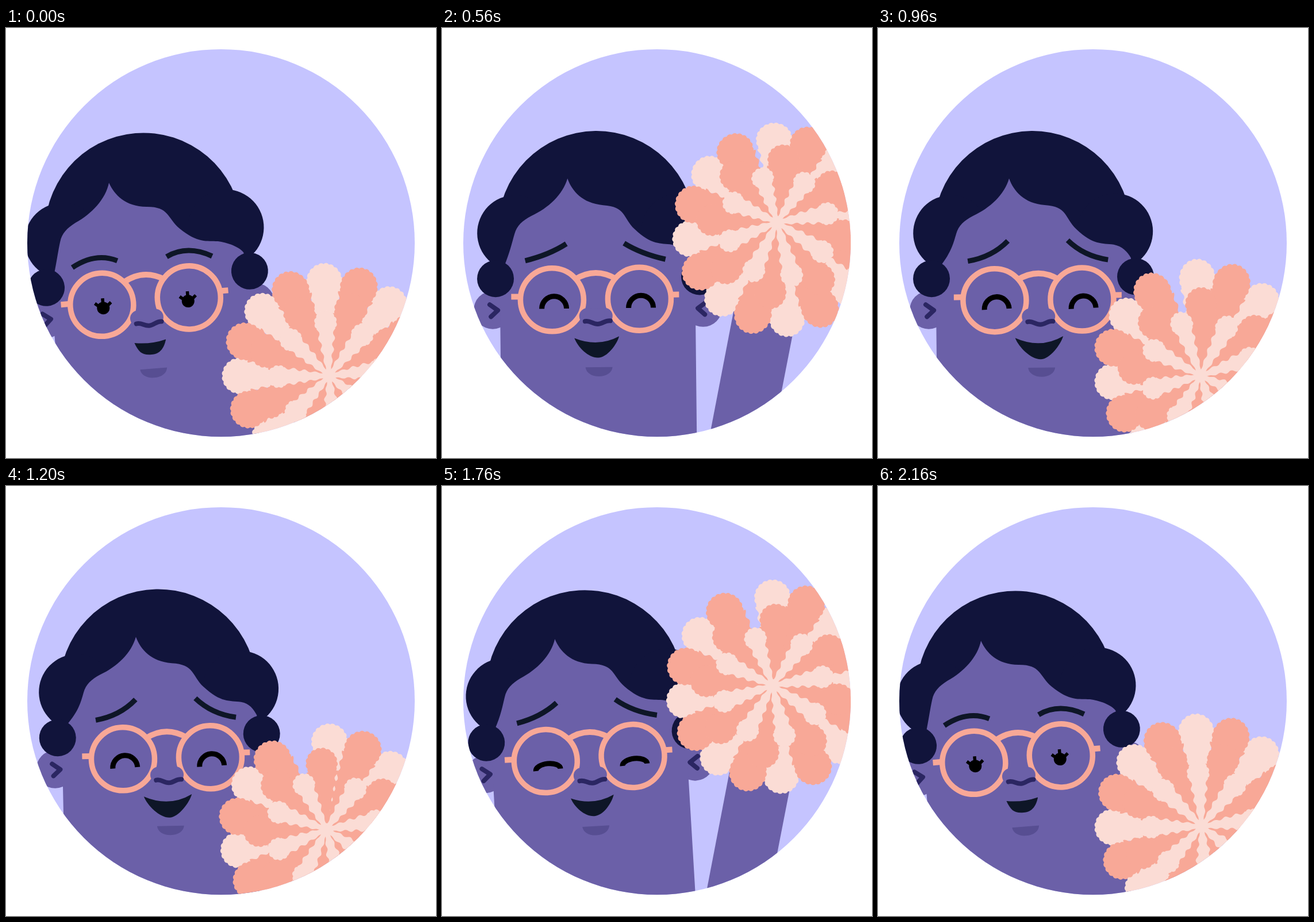
Animation of 748 by 748 pixels, one loop 2.24 s. Source, as an HTML page with a canvas:

```html
<!DOCTYPE html>
<html lang="en">
<head>
<meta charset="utf-8">
<style>
html, body { margin: 0; width: 100%; height: 100%; overflow: hidden; background: #fff; }
canvas { display: block; }
</style>
</head>
<body>
<canvas id="stage" width="748" height="748"></canvas>
<script>
const ctx = document.getElementById('stage').getContext('2d');
const TAU = Math.PI * 2, DEG = Math.PI / 180;
const STEP = 80, STEPS = 28;
const SKIN = '#6b60a8', HAIR = '#11143b', INK = '#0e1627', LINE = '#2b2662';
const CORAL = '#f8a897', PALE = '#fbdcd5';

// Pose tracks, all keyed at the steps in KEYS
const KEYS = [0, 3, 7, 12, 14, 18, 22, 27, 28];
const TRACKS = {
  tilt:    [-4.7, -3.4, -.6, -.6, -.9, -2.25, -3.4, -4.7, -4.7],
  turn:    [-15.5, -15, -11.5, 0, 3, 4, -8.5, -15.5, -15.5],
  worry:   [0, 0, .8, 1, 1, 1, .9, 0, 0],
  smile:   [0, .15, .8, 1, 1, 1, .7, 0, 0],
  x:       [562, 581, 583, 561, 555, 570, 575, 563, 562],
  y:       [605, 375, 338, 605, 635, 378, 347, 592, 605],
  lagX:    [0, 5, 3, 0, 0, -4, 0, 0, 0],
  lagY:    [-8, 15, 11, -14, 0, 5, 2, -8, -8],
  outer:   [-3, -9, -5, -6, -6, -6, -5, -3.5, -3],
  inner:   [-4, -17, -16, -18, -18, -17, -15, -4, -4],
  part:    [0, 10, 2, 4, 6, 16, 5, 0, 0]
};

const mix = (a, b, t) => a + (b - a) * t;

// Monotone cubic interpolation
function sample(values, n) {
  const last = KEYS.length - 1;
  const slope = i => (values[i + 1] - values[i]) / (KEYS[i + 1] - KEYS[i]);
  const tangent = i => {
    if (i === 0 || i === last) return 0;
    const a = slope(i - 1), b = slope(i);
    return a * b > 0 ? 2 * a * b / (a + b) : 0;
  };
  let i = 0;
  while (i < last - 1 && n >= KEYS[i + 1]) i++;
  const h = KEYS[i + 1] - KEYS[i], u = (n - KEYS[i]) / h, v = 1 - u;
  return values[i] * (1 + 2 * u) * v * v + values[i + 1] * u * u * (3 - 2 * u)
    + h * u * v * (tangent(i) * v - tangent(i + 1) * u);
}

function disc(x, y, r, color) {
  ctx.fillStyle = color;
  ctx.beginPath();
  ctx.arc(x, y, r, 0, TAU);
  ctx.fill();
}

function fill(d, color) {
  ctx.fillStyle = color;
  ctx.fill(new Path2D(d));
}

function stroke(d, color, width, cap = 'butt') {
  ctx.strokeStyle = color;
  ctx.lineWidth = width;
  ctx.lineCap = cap;
  ctx.lineJoin = 'round';
  ctx.stroke(new Path2D(d));
}

function drawHead(pose, n) {
  const mid = 274;
  ctx.save();
  ctx.translate(300, 765);
  ctx.rotate(pose.tilt * DEG);
  ctx.translate(-300, -765);

  disc(273, 350.3, 171.5, HAIR);
  for (const s of [-1, 1]) {
    disc(mid + s * 142.5, 355, 66, HAIR);
    disc(mid + s * 183, 488.5, 33, SKIN);
  }

  // Hairline follows the turn of the face, its ends stay put
  const s = pose.turn * .85;
  const p = (x, y) => `${x + s} ${y} `;
  fill('M104 415L111.7 413C' + p(132, 388) + p(136, 370) + p(140.3, 356.3)
    + 'C' + p(144.4, 342) + p(154.5, 333.4) + p(169.6, 325.6)
    + 'C' + p(199.7, 312) + p(225, 289) + p(233.3, 261)
    + 'C' + p(241, 283) + p(258.8, 304.5) + p(294.8, 308)
    + 'C' + p(334.8, 311) + p(328.6, 330) + p(349.4, 350.5)
    + 'C' + p(379, 379) + p(394, 375) + p(414, 378)
    + 'C' + p(429, 381) + '438 391 443.8 401.5V900H104Z', SKIN);

  for (const s of [-1, 1]) disc(mid + s * 177.5, 434, 32, HAIR);
  stroke('M86 479L100 489L88 500M462 479L448 489L460 500', LINE, 8, 'round');

  ctx.translate(206 + pose.turn, 472 + Math.min(1, (pose.turn + 8) / 12));
  drawFace(pose, n);
  ctx.restore();
}

// Origin: middle of the left lens
function drawFace(pose, n) {
  const gap = 152, w = pose.worry, m = pose.smile;

  for (const s of [-1, 1]) {
    const base = s < 0 ? 0 : gap;
    const p = (x, y) => `${base + s * x} ${y} `;
    stroke('M' + p(46, -68.5) + 'Q' + p(4, mix(-92, -75, w))
      + p(mix(-33, -24, w), mix(-74, -103, w)), INK, 9);
  }

  if (n >= 5 && n <= 23) {
    const lift = n === 5 ? 6 : n === 6 ? 15 : n === 21 ? 17 : n === 22 ? 11 : n === 23 ? 5 : 21.5;
    const lean = n < 8 ? 0 : -2.5 * DEG;
    for (const x of [3.5, gap + 2.5]) {
      ctx.strokeStyle = '#000';
      ctx.lineWidth = 9;
      ctx.lineCap = 'butt';
      ctx.beginPath();
      ctx.ellipse(x, 15.5, 21.5, lift, lean, Math.PI, TAU);
      ctx.stroke();
    }
  } else {
    for (const x of [2, gap - 2]) {
      disc(x, 6, 11, '#000');
      stroke(`M${x} 0V-11M${x - 7} 3L${x - 14} -3M${x + 7} 3L${x + 14} -3`, '#000', 5.5);
    }
  }

  for (const x of [0, gap]) {
    ctx.strokeStyle = CORAL;
    ctx.lineWidth = 9.5;
    ctx.beginPath();
    ctx.arc(x, 0, 55, 0, TAU);
    ctx.stroke();
  }
  stroke('M40 -35Q76 -57 112 -35M-71 -6H-57M209 -7H221', CORAL, 10);

  disc(61, 29, 14, SKIN);
  disc(91, 29, 14, SKIN);
  fill('M61 15H91V43H61Z', SKIN);
  stroke('M57 38C66 36 70 43 79 43S92 36 101 37.5', LINE, 8, 'round');

  const lx = mix(51, 35, m), ly = mix(71, 66, m);
  const rx = mix(106, 118.5, m), ry = mix(69, 63.5, m);
  const low = mix(93.5, 103.5, m);
  fill(`M${lx} ${ly}Q79 ${mix(76, 86, m)} ${rx} ${ry}`
    + `C${rx - 4} ${ry + 14} 95 ${low} 79 ${low}`
    + `C62 ${low} ${lx + 6} ${ly + 16} ${lx} ${ly}Z`, INK);
  fill('M57 118H104C103 128 93 134 80.5 134S58 128 57 118Z', '#574e92');
}

// Scalloped drop pointing along +x: wavy sides, round end of radius b around (R, 0)
function dropPath(R, b, widen) {
  const edge = [];
  for (let r = 0; r < R - b / 2; r += 2) {
    edge.push([r, 3 + widen * r + Math.min(2.2, r / 20) * Math.sin(r / 3)]);
  }
  const k = b * Math.PI / 10;
  for (let a = 120; a >= 0; a -= 2) {
    const q = b - 1 + 2 * Math.abs(Math.sin(k * a * DEG));
    edge.push([R + q * Math.cos(a * DEG), q * Math.sin(a * DEG)]);
  }
  const path = new Path2D();
  for (const [x, y] of edge) path.lineTo(x, y);
  for (const [x, y] of edge.reverse()) path.lineTo(x, -y);
  path.closePath();
  return path;
}

const ring = (R, b, widen, odd, color, spin, lag, seam) =>
  ({ R, odd, color, spin, lag, seam, path: dropPath(R, b, widen) });

const RINGS = [
  ring(155, 31, .18, 0, PALE, 'outer', 1, 11.25),
  ring(155, 32, .195, 1, CORAL, 'outer', 1, 11.25),
  ring(116, 27, .222, 1, CORAL, 'inner', .6, -33.75),
  ring(88, 19, .155, 0, PALE, 'inner', .6, -33.75)
];

function drawRing(g, pose) {
  ctx.fillStyle = g.color;
  for (let k = g.odd; k < 16; k += 2) {
    // Petals spread away from the seam when the flower moves fast
    const d = (k * 22.5 + g.seam + 540) % 360 - 180;
    const spread = pose.part * Math.sign(d) * Math.cos(d / 2 * DEG);
    const a = (k * 22.5 - 90 + pose[g.spin] + spread) * DEG;
    const x = pose.lagX * g.lag + g.R * Math.cos(a);
    const y = pose.lagY * g.lag + g.R * Math.sin(a);
    ctx.save();
    ctx.rotate(Math.atan2(y, x));
    ctx.scale(Math.hypot(x, y) / g.R, 1);
    ctx.fill(g.path);
    ctx.restore();
  }
}

function drawFlower(pose) {
  ctx.save();
  ctx.translate(pose.x, pose.y);
  fill('M-46 0H65L-13 400H-123Z', SKIN);
  for (const g of RINGS) drawRing(g, pose);
  disc(0, 0, 11, PALE);
  ctx.restore();
}

function draw(now) {
  const n = Math.floor(now / STEP) % STEPS;
  const pose = {};
  for (const name in TRACKS) pose[name] = sample(TRACKS[name], n);

  ctx.fillStyle = '#fff';
  ctx.fillRect(0, 0, 748, 748);
  ctx.save();
  disc(374, 374, 337, '#c5c4ff');
  ctx.clip();
  drawHead(pose, n);
  drawFlower(pose);
  ctx.restore();
}

const start = performance.now();
function loop() {
  draw(performance.now() - start);
  requestAnimationFrame(loop);
}
loop();
</script>
</body>
</html>
```
